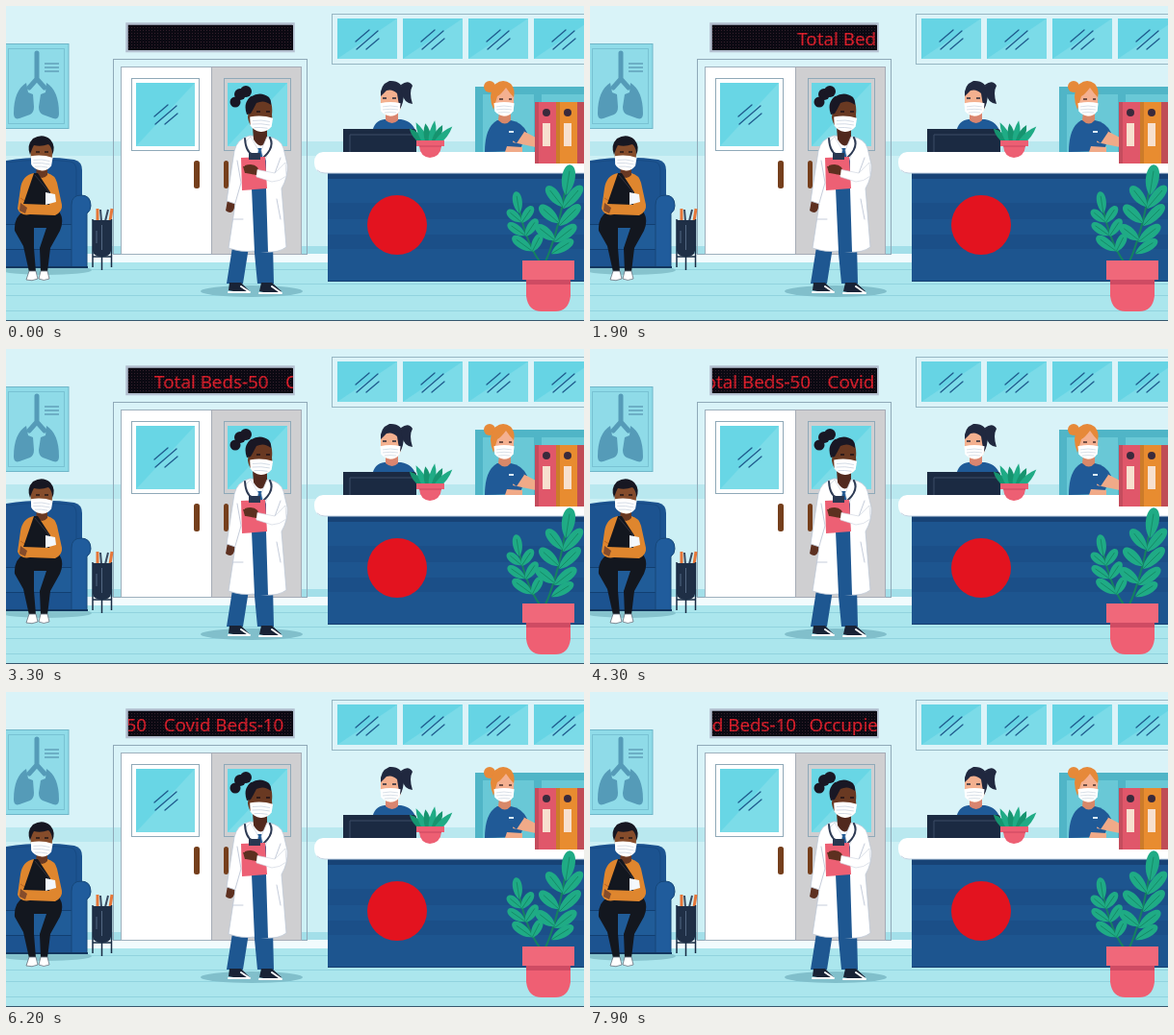
An HTML page that plays this animation: 600x328 px, repeating every 8000 ms.

```html
<!DOCTYPE html>
<html lang="en">
<head>
<meta charset="utf-8">
<title>Hospital reception</title>
<style>
html, body { margin: 0; width: 100%; height: 100%; overflow: hidden; background: #d9f3f8; }
svg { display: block; width: 600px; height: 328px; }
#ticker { font: 500 18.8px "Noto Sans", "Open Sans", sans-serif; fill: #e3212d; stroke: #e3212d; stroke-width: .2; }
.line { fill: none; stroke: #8fa9b8; stroke-width: 1; }
.round { stroke-linecap: round; stroke-linejoin: round; fill: none; }
</style>
</head>
<body>
<svg viewBox="0 0 600 328">
<defs>
  <pattern id="leds" width="3" height="3" patternUnits="userSpaceOnUse">
    <rect width="3" height="3" fill="#0b0912"/><rect x="1" y="1" width="1" height="1" fill="#35202c"/>
  </pattern>
  <pattern id="mesh" width="3" height="3" patternUnits="userSpaceOnUse">
    <path d="M0 .5H3M.5 0V3" stroke="#0b0912" stroke-opacity=".16"/>
  </pattern>
  <clipPath id="screen"><rect x="127" y="20" width="171" height="26"/></clipPath>
  <g id="slashes" class="round" stroke="#1f5b8d" stroke-width="1.3">
    <path d="M-12 3L2 -9M-11 11L11 -8M-1 11L12 0"/>
  </g>
  <g id="mask">
    <path d="M-12 -3Q0 -6 12 -3L11 6Q7 12 0 12Q-8 11 -11 6Z" fill="#fff"/>
    <path d="M-9 1Q0 -1 9 1M-9 4.500Q0 3 9 4.500M-7 8Q0 7 7 8" fill="none" stroke="#c9d3df" stroke-width=".8"/>
  </g>
</defs>

<!-- room -->
<rect width="600" height="328" fill="#d9f3f8"/>
<rect y="141" width="600" height="15" fill="#b9e8ef"/>
<rect y="156" width="600" height="102" fill="#cdf0f5"/>
<rect y="250" width="600" height="8" fill="#a3dfe9"/>
<rect y="258" width="600" height="9" fill="#f1fbfd"/>
<rect y="267" width="600" height="61" fill="#abe6ed"/>
<path d="M0 274.500H600M0 289.500H600M0 301.500H600M0 317.500H600" stroke="#91d3de"/>
<path d="M0 327.500H600" stroke="#35576d"/>

<!-- lung poster -->
<rect x="-2" y="39.500" width="67" height="88" fill="#8fdbe8" stroke="#6fb6c9"/>
<rect x="2.500" y="44.500" width="58" height="78" class="line" style="stroke:#78c2d3"/>
<g fill="#559bb8">
  <path d="M21 80Q8 88 8 112Q8 119 14 117L25 113Q29 111 29 105L28 92L23 90ZM42 80Q55 88 55 112Q55 119 49 117L38 113Q34 111 34 105L36 92L41 90Z"/>
  <path d="M32 49V76L24 85M32 76L40 85" class="round" stroke="#559bb8" stroke-width="5"/>
</g>
<path d="M40 60H55M40 64H55M40 68H55" stroke="#6cafc5" stroke-width="2"/>

<!-- doors -->
<rect x="111.500" y="55.500" width="201" height="203" class="line"/>
<rect x="119.500" y="63.500" width="94" height="195" fill="#fff" stroke="#9eb0bd"/>
<rect x="213.500" y="63.500" width="93" height="195" fill="#cfcfd1" stroke="#a5abb6"/>
<rect x="130.500" y="75.500" width="70" height="75" class="line"/>
<rect x="226.500" y="75.500" width="69" height="75" class="line"/>
<path d="M135 80H196V146H135ZM230 80H292V146H230Z" fill="#68d6e5"/>
<path d="M196 80V146H135ZM292 80V146H230Z" fill="#7cdce8"/>
<use href="#slashes" x="166" y="112"/>
<rect x="195" y="161" width="6" height="29" rx="2.500" fill="#753f1c"/>
<rect x="226" y="161" width="5" height="29" rx="2.500" fill="#753f1c"/>

<!-- LED display -->
<rect x="125.500" y="18.500" width="173" height="28.500" fill="#0b0912" stroke="#b3bfcf" stroke-width="2.500"/>
<rect x="127" y="20" width="171" height="26" fill="url(#leds)"/>
<g clip-path="url(#screen)">
  <g id="ticker">
    <text y="40.500">Total Beds-50</text>
    <text x="136" y="40.500">Covid Beds-10</text>
    <text x="274" y="40.500">Occupied Beds-35</text>
  </g>
  <rect x="127" y="20" width="171" height="26" fill="url(#mesh)"/>
</g>

<!-- windows and cabinet -->
<rect x="338.500" y="8.500" width="270" height="52" fill="#dcf3f8" stroke="#96b6c3"/>
<g id="panes"></g>
<path d="M487 84H600V152H487Z" fill="#50b5c7"/>
<path d="M495 92H548V152H495ZM556 92H600V152H556Z" fill="#69c8d6"/>

<!-- sofa -->
<ellipse cx="42" cy="275" rx="47" ry="5" fill="#86c3cd"/>
<path d="M0 161Q38 155 71 160Q79 162 79 171V272H0Z" fill="#1c5390"/>
<path d="M0 163Q36 158 67 162Q73 163 73 172V235H0" class="round" stroke="#174a83"/>
<path d="M0 227H70V253H0Z" fill="#205c98"/>
<path d="M0 227.500H70M0 253.500H70" stroke="#123f72"/>
<path d="M68 207Q68 197 78 197Q88 197 88 208Q88 213 84 216V272H68Z" fill="#205c9c" stroke="#164779"/>
<path d="M0 272H85" stroke="#12365f" stroke-width="2"/>

<!-- pencil stand -->
<path d="M95 224V211M108 224L110 211" stroke="#e67739" stroke-width="3"/>
<path d="M99 224L98 212M103 224L106 212" stroke="#394a60" stroke-width="2"/>
<path d="M90 223H109V255Q108 261 100 261Q91 261 90 255Z" fill="#1f2f46"/>
<path d="M99.500 228V254M94 234V247" stroke="#536882"/>
<path d="M90 222V272M109.500 222V272M90 261H109M99.500 261V275" stroke="#182b43" stroke-width="1.500"/>

<!-- seated patient -->
<path d="M18 214H55Q61 222 56 234L46 252L43 277H36L35 252L42 231H29L29 252L31 277H24L18 250L9 234Q8 220 18 214Z" fill="#13171f"/>
<path d="M24 276H31L33 284Q27 287 21 285ZM36 276H43L45 284Q39 287 34 284Z" fill="#fff" stroke="#66727e" stroke-width=".8"/>
<path d="M29 174Q17 176 15 190L12 211Q15 219 25 217L51 218Q59 214 58 207L53 184Q51 176 43 174Z" fill="#df862e"/>
<path d="M15 200L24 206" stroke="#bd6420"/>
<path d="M32 168H43V176Q38 182 31 176Z" fill="#693923"/>
<path d="M25 147Q27 139 37 139Q48 140 48 153Q48 169 38 172Q27 171 26 159Z" fill="#854c2b"/>
<path d="M25 155Q21 145 28 138Q38 132 46 139Q52 146 48 155Q48 147 44 144Q36 147 29 145Q27 148 25 155Z" fill="#171722"/>
<use href="#mask" transform="translate(37 160) rotate(4) scale(.95)"/>
<path d="M31 152H35M40 152H44" stroke="#231718" stroke-width="1.300"/>
<path d="M29 174L18 206L45 207L46 194L33 174" fill="#13171f"/>
<path d="M30 176L45 194" stroke="#31313c"/>
<path d="M41 194L51 196L52 204L41 207Z" fill="#f4f8fc"/>
<path d="M15 205L22 210L20 216L14 213Z" fill="#854c2b"/>

<!-- doctor -->
<ellipse cx="255" cy="297" rx="53" ry="6" fill="#81bfcb"/>
<path d="M235 251H252L246 289H229ZM257 247H277L278 289H261Z" fill="#1e5791"/>
<path d="M232 288H244L253 297Q250 300 231 296ZM265 288H276L286 297Q281 301 263 297Z" fill="#192336"/>
<path d="M244 292L253 298H231M276 292L286 299H263" class="round" stroke="#fff" stroke-width="2"/>
<path d="M230 202H238L237 211Q234 218 228 213Z" fill="#5d3020"/>
<path d="M253 135Q240 138 237 151L229 203L238 206L231 252Q245 257 258 255L270 256Q283 257 291 251L286 190Q293 178 292 165L288 148Q285 138 272 136Z" fill="#fff" stroke="#bec8d6" stroke-width=".8"/>
<path d="M255 148H270V190L272 256H258L255 190Z" fill="#1e5791"/>
<path d="M240 161L244 184L238 205M285 158L278 177M281 201L285 222M235 222H246" class="round" stroke="#c5ccda"/>
<path d="M256 126H271V139Q265 152 257 139Z" fill="#51291e"/>
<path d="M254 136L248 142L258 164L262 150ZM271 136L277 141L268 163L265 150Z" fill="#fff" stroke="#c9d0dc" stroke-width=".7"/>
<path d="M248 138Q249 154 258 155M274 137Q279 147 268 157" class="round" stroke="#2e3b54" stroke-width="2"/>
<path d="M244 158L269 157L271 190L245 192Z" fill="#ed6074"/>
<path d="M252 153H264V160H252Z" fill="#293751"/>
<path d="M246 167L257 166L262 169L258 174H248Z" fill="#5d3020"/>
<path d="M259 170L279 174L290 163L291 177Q284 183 276 183L260 178Z" fill="#fff" stroke="#c9d0dc" stroke-width=".6"/>
<path d="M248 166Q256 163 261 168L260 176L249 174Z" fill="#5d3020"/>
<path d="M252 106Q255 94 266 94Q278 96 276 113Q278 129 267 131Q253 130 251 116Z" fill="#693922"/>
<g fill="#191724">
  <circle cx="243" cy="92" r="6"/><circle cx="249" cy="89" r="6"/><circle cx="238" cy="100" r="5.500"/>
  <path d="M250 113Q246 102 253 95Q264 88 273 95Q276 99 275 103Q268 97 260 101Q257 107 254 112Z"/>
</g>
<use href="#mask" transform="translate(265 119) rotate(3)"/>
<path d="M260 110H264M270 110H274" stroke="#1c1218" stroke-width="1.400"/>

<!-- first receptionist -->
<path d="M380 132Q382 119 393 118H410Q423 120 426 133Z" fill="#1f5a97"/>
<path d="M394 110H407V119Q401 125 394 119Z" fill="#d98570"/>
<path d="M389 94Q391 82 401 82Q412 84 411 99Q410 114 399 115Q389 113 389 103Z" fill="#f3b08f"/>
<g fill="#20283f">
  <path d="M389 94Q388 82 398 78Q411 77 413 90Q413 101 409 107Q407 99 406 91Q401 86 395 88Z"/>
  <path d="M410 82Q418 76 422 83Q418 90 422 102Q413 101 411 91Z"/>
</g>
<use href="#mask" transform="translate(399 104) scale(.88)"/>
<path d="M391 96H395M401 96H405" stroke="#26283a" stroke-width="1.300"/>

<!-- second receptionist -->
<path d="M497 152Q497 126 510 119H524Q536 121 541 132L533 151Z" fill="#205a97"/>
<path d="M531 127L550 137V147L526 142ZM520 146L536 147V152H518Z" fill="#f0aa88"/>
<path d="M523 120Q534 122 538 131L530 143L521 136Z" fill="#205a97"/>
<path d="M512 110H524V119Q518 126 511 119Z" fill="#d88869"/>
<path d="M507 94Q509 82 518 82Q529 85 527 99Q528 114 517 115Q508 113 507 103Z" fill="#f4b090"/>
<g fill="#e68939">
  <circle cx="502" cy="84" r="6"/>
  <path d="M506 108Q500 94 506 83Q515 74 524 81Q529 87 527 95Q523 91 519 85Q514 92 510 94Z"/>
</g>
<use href="#mask" transform="translate(517 104) scale(.88)"/>
<path d="M512 97H516M522 97H525" stroke="#4a302e" stroke-width="1.300"/>
<path d="M522 131H527" stroke="#dceefa" stroke-width="2"/>

<!-- desk -->
<path d="M334 172H600V287H334Z" fill="#1d558f"/>
<path d="M334 173H600V180H334Z" fill="#174376"/>
<path d="M334 205H600V222H334ZM334 238H600V253H334Z" fill="#1b4f88"/>
<path d="M334 286.500H600" stroke="#173e70"/>
<path d="M350 128H423Q426 128 426 131V152H350Z" fill="#1b2a42"/>
<path d="M357 152V134H426" class="round" stroke="#3c4d66"/>
<path d="M329 152H600V174H329Q320 173 320 163Q320 153 329 152Z" fill="#fff"/>
<path d="M323 171Q326 174 331 174H600" class="round" stroke="#c3d3e2"/>
<circle cx="406" cy="228" r="31" fill="#e3131f"/>

<!-- binders -->
<path d="M549 100H571V164H549Z" fill="#e0576a"/>
<path d="M571 100H593V164H571Z" fill="#e88c30"/>
<path d="M593 100H600V164H593Z" fill="#c04c55"/>
<path d="M549 100H553V164H549ZM571 100H575V164H571Z" fill="#000" fill-opacity=".12"/>
<path d="M557 122H565V146H557ZM579 122H587V146H579Z" fill="#f7e0cf"/>
<g fill="#3a2a3c"><circle cx="561" cy="111" r="4"/><circle cx="583" cy="111" r="4"/></g>

<!-- plants -->
<g id="leaves"></g>
<path d="M426 140H455V146H452Q451 157 440 158Q430 157 429 146H426Z" fill="#ed5f73"/>
<path d="M429 146H452" stroke="#c9475f"/>
<path d="M540 281H586V302Q584 318 570 318H556Q542 318 540 302Z" fill="#ef5f73"/>
<path d="M540 284H586V290H540Z" fill="#ce4b63"/>
<path d="M536 265H590V285H536Z" fill="#f0687a"/>
</svg>
<script>
const put = (id, html) => document.getElementById(id).innerHTML = html;

put('panes', [344, 412, 480, 548].map(x =>
  `<path d="M${x} 13h62v42h-62z" fill="#66d4e4"/>
   <path d="M${x + 62} 13v42h-62z" fill="#7bdbe8"/>
   <use href="#slashes" x="${x + 31}" y="34"/>`).join(''));

const place = (x, y, turn, art) => `<g transform="translate(${x} ${y}) rotate(${turn})">${art}</g>`;
const leaf = ([x, y, turn, len, w]) => place(x, y, turn,
  `<path d="M0 0C${-w * 1.4} ${-len * .3} ${-w * 1.2} ${-len} 0 ${-len}C${w * 1.2} ${-len} ${w * 1.4} ${-len * .3} 0 0" fill="#1fab85"/>
   <path d="M0 0V${-len * .8}" stroke="#148663" stroke-width=".8"/>`);
const spike = (turn, i) => place(440 + turn / 6, 142, turn,
  `<path d="M-3 0Q-5 -12 0 ${-20 - i % 2 * 3}Q5 -12 3 0" fill="${i % 2 ? '#1fab85' : '#16946f'}"/>`);
const stem = d => `<path d="${d}" class="round" stroke="#14825f" stroke-width="2"/>`;

// Each leaf: base x, base y, angle, length, half-width
const leaves = [
  [581, 197, 9, 32, 7], [578, 209, -38, 27, 6], [578, 211, 40, 31, 6],
  [574, 226, -48, 27, 6], [574, 229, 45, 31, 6],
  [570, 244, -52, 25, 6], [569, 246, 52, 29, 6], [566, 258, 58, 27, 5.5],
  [533, 216, -9, 23, 5], [535, 225, -50, 19, 5], [535, 226, 34, 21, 5],
  [539, 239, -55, 22, 5], [539, 240, 34, 22, 5],
  [546, 255, -54, 25, 5.5], [546, 256, 27, 21, 5]
];
put('leaves', stem('M560 266Q575 232 582 181') + stem('M554 266Q539 245 532 208') +
  [-44, -26, -9, 9, 26, 44].map(spike).join('') + leaves.map(leaf).join(''));

const ticker = document.getElementById('ticker');
const start = performance.now();
function draw(now) {
  const t = Math.max(0, now - start) % 8000;
  const x = 298 - Math.floor(t / 100) * 4.36;
  ticker.setAttribute('transform', `translate(${x} 0)`);
  requestAnimationFrame(draw);
}
draw(start);
</script>
</body>
</html>
```
